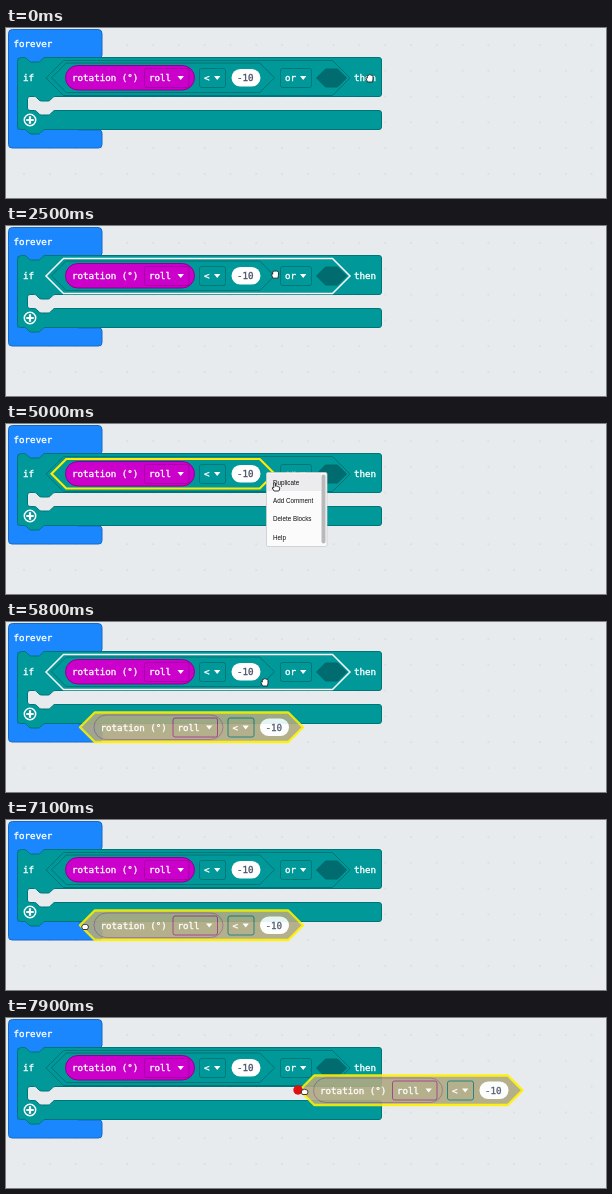
Animation of 600 by 170 pixels, one loop 8000 ms. Source, as an HTML page:

```html
<!DOCTYPE html>
<html>
<head>
<meta charset="utf-8">
<style>
  html, body { margin: 0; width: 100%; height: 100%; overflow: hidden; background: #e8ebee; }
  svg { display: block; }
  text { font: 9.2px "DejaVu Sans Mono", monospace; fill: #fff; stroke: #fff; stroke-width: .35px; white-space: pre; }
  .menu text { font: 6.3px "Liberation Sans", Arial, sans-serif; fill: #111; stroke: none; }
  text.number { fill: #4c5468; stroke: #4c5468; }
</style>
</head>
<body>
<svg id="stage" width="600" height="170" viewBox="0 0 600 170"></svg>
<script>
const TEAL = '#009899', TEAL_EDGE = '#007577', BLUE = '#1b87ff', BLUE_EDGE = '#1669c4';
const OUTER = [40, 344, 32.5, 67.5], INNER = [45.5, 268.5, 35, 64.5], SLOT = [310.5, 340.5, 41, 59];

// Connector tab drawn left to right (s = 1) or right to left (s = -1)
const tab = s => `c${1.1 * s} 0 ${1.7 * s} .6 ${2.3 * s} 1.1l${2.3 * s} 2.3c${.6 * s} .6 ${1.1 * s} 1.1 ${2.3 * s} 1.1` +
  `h${6.9 * s}c${1.1 * s} 0 ${1.7 * s} -.6 ${2.3 * s} -1.1l${2.3 * s} -2.3c${.6 * s} -.6 ${1.1 * s} -1.1 ${2.3 * s} -1.1`;
const path = (d, fill, stroke = 'none', width = 1, extra = '') =>
  `<path d="${d}" fill="${fill}" stroke="${stroke}" stroke-width="${width}" ${extra}/>`;
const hex = ([l, r, t, b]) => {
  const h = (b - t) / 2;
  return `M${l} ${t + h}L${l + h} ${t}H${r - h}L${r} ${t + h}L${r - h} ${b}H${l + h}Z`;
};
const box = (x, y, w, h, r, fill, stroke = 'none', extra = '') =>
  `<rect x="${x}" y="${y}" width="${w}" height="${h}" rx="${r}" fill="${fill}" stroke="${stroke}" ${extra}/>`;
const label = (x, y, s, extra = '') => `<text x="${x}" y="${y}" ${extra}>${s}</text>`;
const dropdown = (x, w, s, edge) => box(x, 40.5, w, 19, 2, 'none', edge, 'stroke-width=".9"') +
  label(x + 4.5, 53, s) + path(`M${x + w - 11.5} 48h6.4l-3.2 4z`, '#fff');

const comparison = (fill, edge, pill, pillEdge, menuEdge, width = 1) =>
  path(hex(INNER), fill, edge, width, 'stroke-linejoin="round"') +
  box(59.5, 37.5, 129, 24.5, 12.25, pill, pillEdge) +
  label(66, 53, 'rotation (°)') + dropdown(138.5, 44.5, 'roll', menuEdge) +
  dropdown(193.5, 26, '&lt;', TEAL_EDGE) +
  box(225.5, 41, 29, 17.5, 8.75, '#fff') + label(231, 53, '-10', 'class="number"');

const foreverShape = 'M2.5 5.5q0-4 4-4H92q4 0 4 4V27q0 3-3 3H12V102H93q3 0 3 3V116.5q0 3.5-3.5 3.5H6q-3.5 0-3.5-3.5Z';
const ifShape = `M11.5 33.5q0-4 4-4h2.9${tab(1)}H373q2.500 0 2.500 2.500V66q0 2.500-2.500 2.500H49${tab(-1)}H24q-2.500 0-2.500 2.500` +
  `V80q0 2.500 2.500 2.500H28.400${tab(1)}H373q2.500 0 2.500 2.500V99q0 2.500-2.500 2.500H39${tab(-1)}H14.500q-3 0-3-3Z`;

const items = ['Duplicate', 'Add Comment', 'Delete Blocks', 'Help'];
const stage = document.getElementById('stage');
stage.innerHTML = `
<defs>
  <pattern id="grid" x="5" y="4" width="25.8" height="25.8" patternUnits="userSpaceOnUse">
    ${path('M12.3 13h1.4M13 12.3v1.4', 'none', '#ccd2d7')}
  </pattern>
  <pattern id="hatch" width="2" height="2" patternUnits="userSpaceOnUse">
    ${box(0, 0, 2, 2, 0, '#bab586')}${box(0, 0, 1, 1, 0, '#a39f7e')}${box(1, 1, 1, 1, 0, '#a39f7e')}
  </pattern>
</defs>
${box(0, 0, 600, 170, 0, 'url(#grid)')}
${path(foreverShape, BLUE, BLUE_EDGE)}
${box(12, 29, 40, 8, 0, BLUE)}${box(12, 98, 60, 10, 0, BLUE)}
${label(7.5, 19, 'forever')}
${path(ifShape, TEAL, TEAL_EDGE)}
${label(17, 53, 'if')}${label(348, 53, 'then')}
<circle cx="24" cy="92" r="5.7" fill="none" stroke="#fff" stroke-width="1.5"/>
${path('M24 88.3v7.4M20.3 92h7.4', 'none', '#fff', 2.2)}
${path(hex(OUTER), TEAL, TEAL_EDGE)}
${dropdown(274.5, 31, 'or', TEAL_EDGE)}
${path(hex(SLOT), '#006c70', '#00686b')}
${comparison(TEAL, TEAL_EDGE, '#cb00cb', '#8d008f', '#a500a7')}
${path(hex(OUTER), 'none', '#fff', 1.5, 'id="hoverOuter"')}
${path(hex(INNER), 'none', '#fff', 1.5, 'id="hoverInner"')}
${path(hex(INNER), 'none', '#ffea00', 2.2, 'id="selected"')}
<g id="copy" opacity=".9">${comparison('url(#hatch)', '#fff000', 'url(#hatch)', '#96708a', '#9c2a86', 2.4)}</g>
<circle id="dot" r="4.7" fill="#e01010"/>
<g id="menu" class="menu">
  ${box(260.5, 48.5, 60.5, 74, 1.5, '#fbfbfb', '#c9cccd', 'stroke-width=".8"')}
  ${box(261, 49.5, 54, 17.5, 0, '#ececee', 'none', 'id="hoverItem"')}
  ${box(315.5, 50.5, 4, 69, 2, '#b9b9bb')}
  ${items.map((s, i) => label(267, 60.5 + i * 18.4, s)).join('')}
</g>
<g id="cursor" stroke-linejoin="round">
  ${path('M-2.5 4L-4 .5q0-1.2 1.3-.4V-2.5q.8-1 1.4 0q.6-1.5 1.4-.5q.8-.8 1.5.4q1-.6 1.4.6V1L2.5 4Z', '#fff', '#222', .9, 'id="open"')}
  ${path('M-2 4L-3.8 1q.2-1.2 1.6-.2V-4q.8-1.2 1.7 0V-.8q1-.7 1.7.2q1-.4 1.5.5q1 0 1 1V2L2.8 4Z', '#fff', '#222', .9, 'id="point"')}
  ${path('M-2.2 3.5L-3.3 1q-.2-1.5 1-1.5q.3-1.5 1.5-.9q.8-.7 1.5 0q1-.4 1.5.5q1 0 1.1 1V1.5L2.4 3.5Z', '#fff', '#222', .9, 'id="fist"')}
</g>`;

const el = id => document.getElementById(id);
const show = (id, on) => el(id).style.display = on ? '' : 'none';
const move = (id, x, y) => el(id).setAttribute('transform', `translate(${x} ${y})`);
const inside = ([l, r, t, b], [x, y]) => {
  const inset = Math.abs(y - (t + b) / 2);
  return inset < (b - t) / 2 && x > l + inset && x < r - inset;
};

// Keys are [time, x, y]
function track(keys, t, ease) {
  const i = keys.findIndex(k => k[0] > t);
  if (i < 0) return keys[keys.length - 1].slice(1);
  if (i === 0) return keys[0].slice(1);
  const [a, b] = [keys[i - 1], keys[i]];
  const k = ease((t - a[0]) / (b[0] - a[0]));
  return [a[1] + (b[1] - a[1]) * k, a[2] + (b[2] - a[2]) * k];
}
const smooth = k => k * k * (3 - 2 * k), linear = k => k;
const POINTER = [[200, 364, 50], [1200, 321, 49], [1900, 321, 49], [2700, 260, 48], [4200, 260, 48],
  [4800, 270, 63], [5300, 270, 63], [5700, 259, 60], [6000, 259, 60], [6900, 79, 106]];
const DRAG = [[7150, 28.5, 55.5], [7300, 56, 53], [7500, 140, 43], [7700, 228, 30.5], [7900, 248, 22.5]];
const MENU = 3900, PICK = 5200, GRAB = 7000;

function frame(now) {
  const t = now % 8000;
  const copy = track(DRAG, t, linear);
  const p = track(POINTER, t, smooth);
  const cursor = [p[0] + copy[0] - 28.5, p[1] + copy[1] - 55.5];
  const menuOpen = t >= MENU && t < PICK;
  const hovering = !menuOpen && t < GRAB;
  const onInner = inside(INNER, cursor);
  show('hoverInner', hovering && onInner);
  show('hoverOuter', hovering && !onInner && inside(OUTER, cursor));
  show('selected', menuOpen);
  show('menu', menuOpen);
  show('hoverItem', cursor[1] > 50);
  show('copy', t >= PICK);
  show('dot', t >= 7650);
  show('open', !menuOpen && t < GRAB);
  show('point', menuOpen);
  show('fist', t >= GRAB);
  move('copy', ...copy);
  move('dot', copy[0] + 44, copy[1] + 49.5);
  move('cursor', ...cursor);
  requestAnimationFrame(frame);
}
requestAnimationFrame(frame);
</script>
</body>
</html>
```
